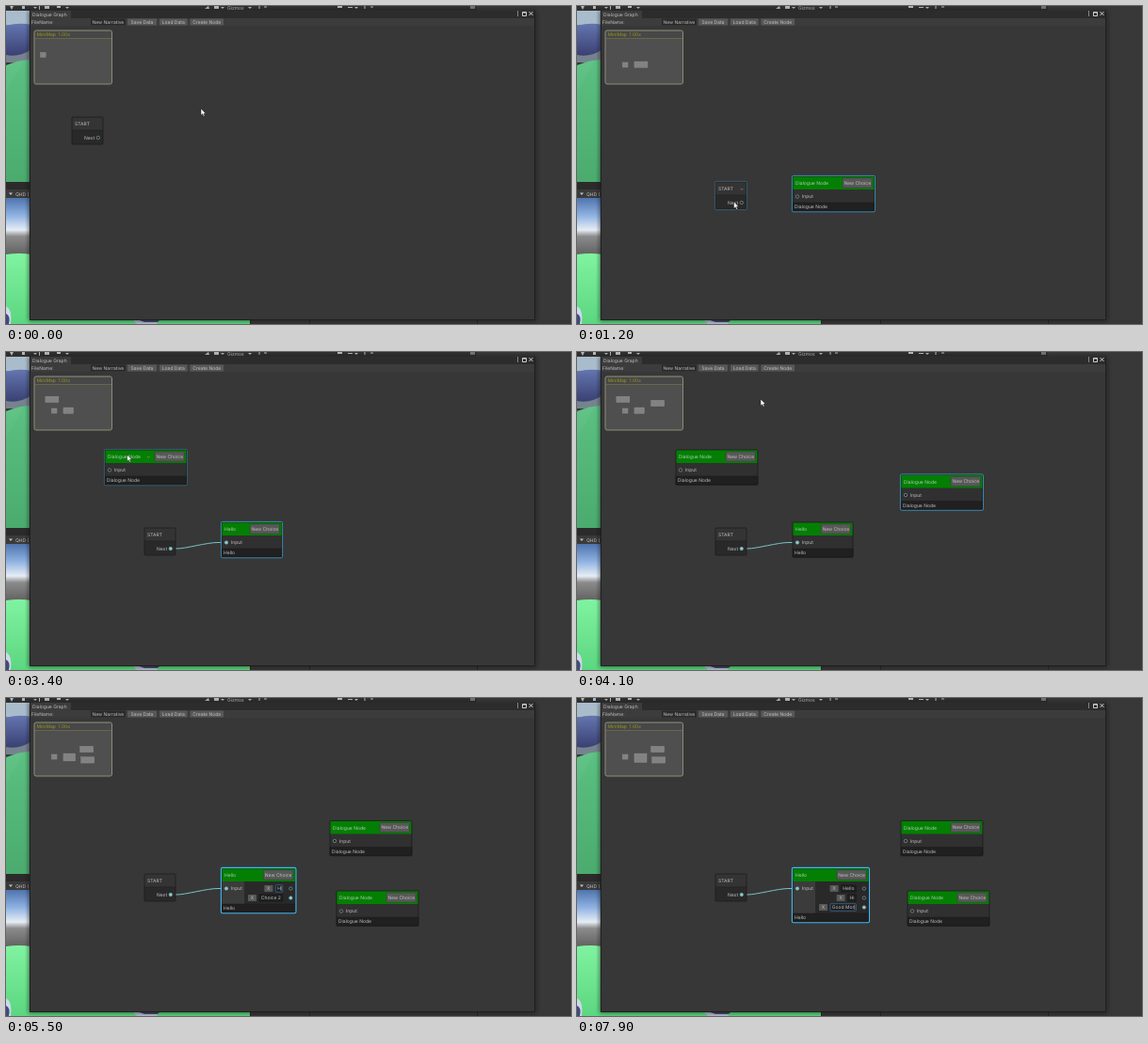
An HTML page for the animation above (8 s loop, 600x338 px).

```html
<!DOCTYPE html>
<html lang="en">
<head>
<meta charset="utf-8">
<title>Dialogue Graph</title>
<style>
  html, body { margin: 0; width: 100%; height: 100%; overflow: hidden; background: #383838; }
  svg { display: block; width: 600px; height: 338px; }
  text { font: 5px Inter, Roboto, sans-serif; fill: #c0c0c0; white-space: pre; text-rendering: geometricPrecision; }
</style>
</head>
<body>
<svg viewBox="0 0 600 338">
  <defs>
    <linearGradient id="sky" x1="0" y1="0" x2="0" y2="1">
      <stop offset="0" stop-color="#4f74ad"/><stop offset=".3" stop-color="#8fb2e2"/><stop offset=".55" stop-color="#e6edf4"/>
      <stop offset=".66" stop-color="#8b8b8c"/><stop offset="1" stop-color="#5f5e5d"/>
    </linearGradient>
    <linearGradient id="blob" x1="0" y1="0" x2="0" y2="1">
      <stop offset="0" stop-color="#6476b0"/><stop offset="1" stop-color="#3a4072"/>
    </linearGradient>
    <linearGradient id="field" x1="0" y1="0" x2="0" y2="1">
      <stop offset="0" stop-color="#62c487"/><stop offset="1" stop-color="#4aa46b"/>
    </linearGradient>
    <linearGradient id="lawn" x1="0" y1="0" x2="0" y2="1">
      <stop offset="0" stop-color="#80f3a0"/><stop offset="1" stop-color="#5cd680"/>
    </linearGradient>
    <filter id="soft" x="-5%" y="-5%" width="110%" height="112%"><feGaussianBlur stdDeviation="2"/></filter>
  </defs>

  <!-- editor behind the window -->
  <rect width="600" height="338" fill="#383838"/>
  <rect width="500" height="5" fill="#303030"/>
  <path d="M0 5H27V60H0Z" fill="#76838f"/>
  <path d="M0 5H27V20H0Z" fill="#a9bccb"/>
  <path d="M0 21Q14 17 27 20V46Q14 55 0 52Z" fill="url(#blob)"/>
  <path d="M0 63Q14 57 27 57V187H0Z" fill="url(#field)"/>
  <path d="M0 92L19 58H27V187H0Z" fill="#4fb875" opacity=".35"/>
  <path d="M0 187H27V204H0Z" fill="#2b2b2b"/>
  <path d="M0 195H27V204H0Z" fill="#3a3a3a"/>
  <path d="M3 198.500h4l-2 2.500z" fill="#c4c4c4"/>
  <text x="10" y="201.500">QHD (2</text>
  <rect y="204" width="27" height="62" fill="url(#sky)"/>
  <path d="M0 264Q14 262 27 264V332H259V338H0Z" fill="url(#lawn)"/>
  <path d="M0 319Q7 323 5 338H0Z" fill="#cfd8ea"/>
  <path d="M0 327Q5 329 3 338H0Z" fill="#404a7c"/>
  <path d="M134 333H163L160 338H139Z" fill="#b3bfd4"/>
  <path d="M139 333H164L161 336H147Z" fill="#3d4766"/>
  <path d="M259 333h1v5h-1zM322 333h1v5h-1zM500 333h1v5h-1z" fill="#252525"/>
  <g fill="#b5b5b5">
    <path d="M4 0h4l-2 4zM17 0h3v3h-3zM29 1h4l-2 2zM35 0h1v4h-1zM41 0h5v3h-5zM54 0h4v2h-4zM63 1h4l-2 2z"/>
    <path d="M211 3l4-3 1 3zM221 0h5v3h-5zM228 1h4l-2 2zM257 1h4l-2 2zM352 0h5v2h-5zM363 1h5v1h-5zM370 1h4l-2 2z"/>
    <path d="M268 0h2v3h-2zM274 0h3v2h-3zM380 0h2v3h-2zM387 0h3v2h-3zM493 0h5v3h-5z" opacity=".5"/>
    <text x="235" y="3.500">Gizmos</text>
  </g>

  <!-- window -->
  <rect x="24" y="5" width="539" height="330" fill="#161616" opacity=".6" filter="url(#soft)"/>
  <rect x="25" y="5" width="537" height="329" fill="#202020"/>
  <rect x="26" y="5" width="535" height="8" fill="#2c2c2c"/>
  <rect x="26" y="5" width="43" height="8" fill="#3c3c3c"/>
  <text x="28" y="11">Dialogue Graph</text>
  <path d="M543 5.500h1v1h-1zM543 7.500h1v1h-1zM543 9.500h1v1h-1z" fill="#ddd"/>
  <path d="M548.500 6.500h4v4h-4zM548.500 7h4M555.500 6l4 4m0-4l-4 4" fill="none" stroke="#ddd" stroke-width=".9"/>
  <rect x="26" y="13" width="535" height="8" fill="#3c3c3c"/>
  <text x="27" y="18.500">FileName:</text>
  <rect x="90" y="13.500" width="37" height="7" fill="#2a2a2a"/>
  <text x="91.500" y="18.700">New Narrative</text>
  <g id="bar"></g>
  <rect x="26" y="21" width="535" height="312" fill="#373737"/>
  <svg id="graph" x="26" y="21" width="535" height="312" viewBox="26 21 535 312"></svg>
  <g id="map"></g>
  <path id="cursor" d="M0 0V7.200L1.700 5.700 2.900 8.300 4.100 7.700 3 5.200H5.200Z" fill="#fff" stroke="#111" stroke-width=".5"/>
</svg>
<script>
const $ = id => document.getElementById(id);
const pen = document.createElement('canvas').getContext('2d');
pen.font = '50px Inter, Roboto, sans-serif';
const textW = s => pen.measureText(s).width / 10;

const rect = (x, y, w, h, fill, more = '') =>
  `<rect x="${x}" y="${y}" width="${w}" height="${h}" fill="${fill}" ${more}/>`;
const label = (x, y, s, more = '') => `<text x="${x}" y="${y + 1.8}" ${more}>${s}</text>`;
const mid = 'text-anchor="middle"';
const line = (d, color, w) => `<path d="${d}" fill="none" stroke="${color}" stroke-width="${w}"/>`;
const port = (x, y, full) =>
  `<circle cx="${x}" cy="${y}" r="1.7" fill="${full ? '#86cdd0' : '#232323'}" stroke="#8fb0b3" stroke-width=".6"/>`;
const chevron = (x, y) => line(`M${x - 1.5} ${y - .6}l1.500 1.500 1.500-1.500`, '#999', .6);

// Outline strength grows from hover to selection to both.
function outline(x, y, w, h, on, hover) {
  const dark = rect(x, y, w, h, 'none', 'rx="1" stroke="#1c1c1c" stroke-width=".8"');
  if (!on && !hover) return dark;
  const [color, size] = on && hover ? ['#44b8f0', 1.1] : on ? ['#3d93bb', .9] : ['#3a6780', .8];
  return dark + rect(x - .6, y - .6, w + 1.2, h + 1.2, 'none', `rx="1.5" stroke="${color}" stroke-width="${size}"`);
}

// Linear track of [tick, x, y] points; one tick is 100 ms.
function at(track, k) {
  const i = track.findIndex(p => p[0] > k);
  if (i < 0) return track[track.length - 1].slice(1);
  if (!i) return track[0].slice(1);
  const a = track[i - 1], b = track[i], u = (k - a[0]) / (b[0] - a[0]);
  return [a[1] + (b[1] - a[1]) * u, a[2] + (b[2] - a[2]) * u];
}
const within = (k, ...spans) => spans.some(([a, b]) => k >= a && k <= b);
const inside = ([mx, my], x, y, w, h) => mx >= x && mx <= x + w && my >= y && my <= y + h;
const typed = (s, from, k) => s.slice(0, Math.max(0, k - from));

const startPath = [[8, 70, 118], [9, 127, 169], [10, 147, 187]];
const helloPath = [[4, 27, 21], [6, 152, 112], [8, 152, 112], [9, 209, 163], [10, 229, 181]];
const secondPath = [[32, 27, 21], [34, 105, 104], [43, 105, 104], [46, 351, 205]];
const thirdPath = [[36, 27, 21], [37, 344, 130.5]];
const mousePath = [
  [0, 207, 109], [2, 212, 15], [3, 212, 15], [4, 45, 27], [6, 170, 118], [7, 200, 165],
  [8, 80, 122], [9, 137, 173], [10, 157, 191], [12, 166.5, 208], [13, 173, 208], [16, 233, 202],
  [18, 246, 211], [28, 246, 211], [30, 212, 15], [31, 212, 15], [32, 50, 26], [34, 128.5, 109],
  [35, 212, 15], [36, 51, 26], [37, 368, 136], [38, 368, 136], [41, 195, 50], [43, 128, 109],
  [46, 374, 210], [48, 277, 186], [50, 288, 186], [52, 290, 200], [62, 290, 200], [64, 278, 211],
  [67, 278, 208], [68, 280, 195], [69, 282, 186], [70, 282, 186], [72, 284, 221]
];

function startNode(k, [x, y], mouse) {
  const hover = inside(mouse, x, y, 33, 29);
  return rect(x, y, 33, 14, '#343434', 'rx="1"') + rect(x, y + 14, 33, 15, '#292929')
    + line(`M${x} ${y + 14}h33`, '#202020', .7)
    + label(x + 3, y + 7.2, 'START') + (hover ? chevron(x + 28, y + 7.5) : '')
    + label(x + 13, y + 21.8, 'Next') + port(x + 27.8, y + 22, k >= 13)
    + outline(x, y, 33, 29, within(k, [7, 11]), hover);
}

function nodeSize(n) {
  const fields = n.choices.map(c => textW(c.text) + 3.8);
  const w = Math.max(textW(n.text) + 52, fields.length ? 53.5 + Math.max(...fields) : 0);
  return { w, body: 14 + 10 * Math.max(0, fields.length - 1), fields };
}

function dialogueNode(n, mouse) {
  const [x, y] = n.pos, { w, body, fields } = nodeSize(n);
  const r = x + w, h = body + 23.2, foot = y + 14 + body;
  const hover = inside(mouse, x, y, w, h);
  let s = rect(x, y, w, h, '#303030', 'rx="1"') + rect(x, y, w, 14, '#038003', 'rx="1"')
    + label(x + 3, y + 7.2, n.text, 'style="fill:#b4ccb4"')
    + rect(r - 34, y + 2, 31.5, 10.2, '#585858', 'rx=".8" stroke="#303030" stroke-width=".4"')
    + label(r - 18.2, y + 7, 'New Choice', mid);
  if (hover && !fields.length) s += chevron(r - 40.5, y + 7.5);
  if (fields.length) s += rect(x, y + 14, 24, body, '#3b3b3b') + rect(x + 24, y + 14, w - 24, body, '#292929');
  s += port(x + 5, y + 21.5, n.linked) + label(x + 10, y + 21.3, 'Input');
  n.choices.forEach((c, i) => {
    const cy = y + 21.5 + 10 * i, fw = fields[i], fx = r - 13.5 - fw;
    s += rect(fx - 12, cy - 3.5, 9, 7, '#585858', 'rx=".6"') + label(fx - 7.5, cy, 'X', mid)
      + rect(fx, cy - 3.8, fw, 7.6, '#1f1f1f', `rx=".6" stroke="${c.focus ? '#3d7dbb' : '#1a1a1a'}" stroke-width=".6"`)
      + label(fx + 1.8, cy, c.text) + port(r - 5, cy, c.full);
    if (c.focus) s += line(`M${fx + fw - 1.6} ${cy - 2.6}v5.200`, '#ddd', .5);
  });
  s += rect(x, foot, w, 9.2, '#202020', `rx=".8" stroke="${n.focus ? '#3d7dbb' : '#1a1a1a'}" stroke-width=".5"`)
    + label(x + 2, foot + 4.6, n.text);
  if (n.focus) s += line(`M${x + 2.5 + textW(n.text)} ${foot + 2}v5.200`, '#ddd', .5);
  return s + outline(x, y, w, h, n.on, hover);
}

function choicesAt(k) {
  const list = [];
  if (k >= 49) list.push({ text: k < 53 ? 'Choice 1' : typed('Hello', 54, k), focus: within(k, [52, 62]) });
  if (k >= 50) list.push({ text: k < 63 ? 'Choice 2' : typed('Hi', 63, k), focus: within(k, [63, 69]), full: k < 63 });
  if (k >= 70) list.push({
    text: k < 73 ? 'Choice 3' : typed('Good Mor', 73, k < 76 ? k : k + 2), focus: k >= 72, full: true
  });
  return list;
}

function nodesAt(k) {
  const base = { text: 'Dialogue Node', choices: [] }, list = [];
  if (k >= 3) list.push({
    ...base, pos: at(helloPath, k), text: k < 20 ? base.text : typed('Hello', 20, k),
    choices: choicesAt(k), linked: k >= 16, focus: within(k, [19, 27]),
    on: within(k, [4, 34], [48, 80])
  });
  if (k >= 31) list.push({ ...base, pos: at(secondPath, k), on: within(k, [43, 47]) });
  if (k >= 36) list.push({ ...base, pos: at(thirdPath, k), on: within(k, [36, 42]) });
  return list;
}

function wire(k, mouse) {
  if (k < 14) return '';
  const [ex, ey] = k < 16 ? mouse : [234, 202.5];
  return line(`M175 209H181C191 209 ${ex - 21} ${ey} ${ex - 9} ${ey}H${ex}`, '#78c3c6', 1);
}

function miniMap(boxes) {
  return rect(30, 26, 82.5, 57, '#4f4f4f', 'rx="2" stroke="#8c8c78" stroke-width="1"')
    + rect(31, 27, 80.5, 7, '#474747') + line('M31 34.500H112', '#77774a', .6)
    + label(32.5, 30.2, 'MiniMap  1.00x', 'style="fill:#98981c"')
    + boxes.map(([x, y, w, h]) => rect(25.7 + .154 * x, 31.2 + .154 * y, .154 * w + .6, .154 * h + .6,
      '#828282', 'stroke="#929292" stroke-width=".4"')).join('');
}

function draw(k) {
  const mouse = at(mousePath, k), start = at(startPath, k), nodes = nodesAt(k);
  const marquee = k === 7 ? rect(60, 102, 140, 63, 'none', 'stroke="#8ab" stroke-width=".5" stroke-dasharray="2 1"') : '';
  $('graph').innerHTML = wire(k, mouse) + startNode(k, start, mouse)
    + nodes.map(n => dialogueNode(n, mouse)).join('') + marquee;
  $('map').innerHTML = miniMap([[...start, 33, 29], ...nodes.map(n => {
    const { w, body } = nodeSize(n);
    return [...n.pos, w, body + 23];
  })]);
  $('cursor').setAttribute('transform', `translate(${mouse})`);
  $('cursor').style.display = within(k, [19, 28], [52, 62], [72, 80]) ? 'none' : '';
}

$('bar').innerHTML = [[129, 31, 'Save Data'], [163, 29.5, 'Load Data'], [195.5, 35.5, 'Create Node']]
  .map(([x, w, s]) => rect(x, 13.5, w, 7, '#585858', 'rx=".6"') + label(x + w / 2, 16.9, s, mid)).join('');

let last = -1;
function tick() {
  const k = Math.floor(performance.now() % 8000 / 100);
  if (k !== last) draw(last = k);
  requestAnimationFrame(tick);
}
tick();
</script>
</body>
</html>
```
